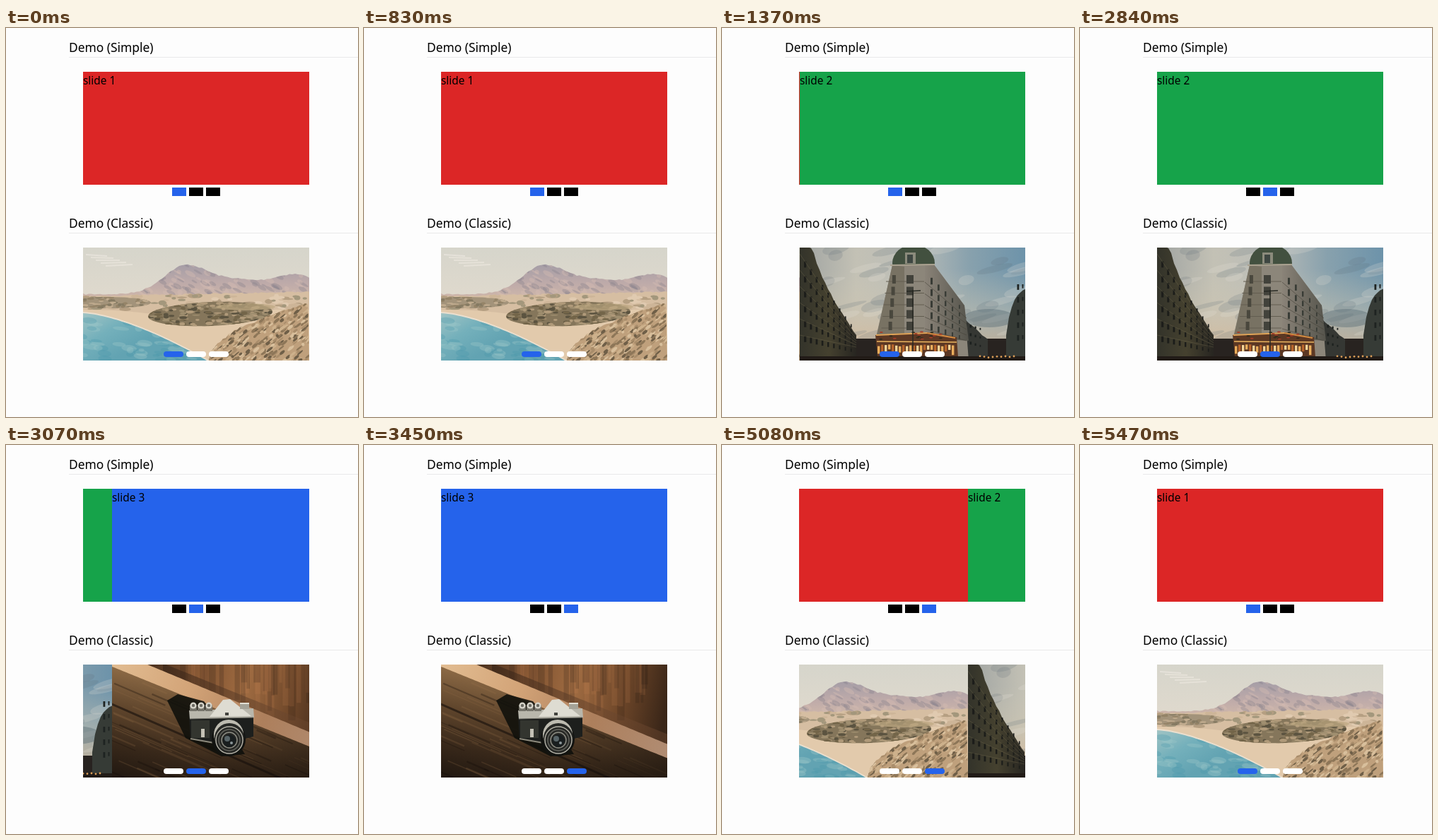
Recreate the animation shown at these times as an HTML page with a canvas. Size 498x551 px, loop 5490 ms.

```html
<!DOCTYPE html>
<html lang="en">
<head>
<meta charset="utf-8">
<title>Carousel demo</title>
<style>
html, body { margin: 0; width: 100%; height: 100%; overflow: hidden; background: #fdfdfd; }
body { position: relative; color: #000; font-family: "Noto Sans", "Open Sans", sans-serif; }
h2 { position: absolute; left: 89px; right: 0; margin: 0; height: 28px; font-size: 17.4px; font-weight: 400; line-height: 28px; border-bottom: 1px solid #e9e9ea; }
.view { position: absolute; left: 109px; width: 320px; height: 160px; overflow: hidden; }
.strip { display: flex; width: 960px; height: 160px; }
.slide { width: 320px; font-size: 15.4px; line-height: 25px; }
.dot { position: absolute; }
.simple { top: 226px; width: 20px; height: 12px; background: #000; }
.classic { top: 458px; width: 28px; height: 8px; border-radius: 4px; background: #fff; }
.dot.on { background: #2563eb; }
</style>
</head>
<body>
<h2 style="top:13px">Demo (Simple)</h2>
<div class="view" style="top:62px">
  <div class="strip">
    <div class="slide" style="background:#dc2626">slide 1</div>
    <div class="slide" style="background:#16a34a">slide 2</div>
    <div class="slide" style="background:#2563eb">slide 3</div>
  </div>
</div>
<h2 style="top:262px">Demo (Classic)</h2>
<div class="view" style="top:311px">
  <div class="strip"><canvas id="pics" width="960" height="160"></canvas></div>
</div>
<script>
const W = 320, H = 160;
const c = document.getElementById('pics').getContext('2d');

let seed = 7;
function rnd(lo = 0, hi = 1) {
  seed = (seed * 16807) % 2147483647;
  return lo + (hi - lo) * seed / 2147483647;
}
const times = (n, fn) => { for (let i = 0; i < n; i++) fn(i); };
const bump = (x, mid, width, height) => height * Math.exp(-(((x - mid) / width) ** 2));

function paint(path, fill) {
  c.fillStyle = fill;
  c.fill(path);
  return path;
}
function rect(x, y, w, h, fill) {
  c.fillStyle = fill;
  c.fillRect(x, y, w, h);
}
function poly(fill, ...points) {
  const p = new Path2D();
  points.forEach(([x, y]) => p.lineTo(x, y));
  p.closePath();
  return paint(p, fill);
}
function oval(x, y, rx, ry, fill, tilt = 0) {
  const p = new Path2D();
  p.ellipse(x, y, rx, ry, tilt, 0, 7);
  return paint(p, fill);
}
const disc = (x, y, r, fill) => oval(x, y, r, r, fill);
function ring(x, y, r, color) {
  c.strokeStyle = color;
  c.lineWidth = 1.4;
  c.beginPath();
  c.arc(x, y, r, 0, 7);
  c.stroke();
}
function line(x1, y1, x2, y2, color, w = 1) {
  c.strokeStyle = color;
  c.lineWidth = w;
  c.beginPath();
  c.moveTo(x1, y1);
  c.lineTo(x2, y2);
  c.stroke();
}
// Everything below the curve y = f(x)
function below(f, fill, x0 = 0, x1 = W, rough = 0) {
  const p = new Path2D();
  p.moveTo(x0, H);
  for (let x = x0; x <= x1; x += 4) p.lineTo(x, f(x) + rnd(-rough, rough));
  p.lineTo(x1, H);
  p.closePath();
  return paint(p, fill);
}
function grad(x1, y1, x2, y2, ...colors) {
  const g = c.createLinearGradient(x1, y1, x2, y2);
  colors.forEach((k, i) => g.addColorStop(i / (colors.length - 1), k));
  return g;
}
// Scatter small blobs inside a path
function mottle(path, [x, y, w, h], n, size, colors, tilt = 0) {
  c.save();
  c.clip(path);
  times(n, i => oval(rnd(x, x + w), rnd(y, y + h), size * rnd(0.5, 1.5), size * rnd(0.2, 0.6), colors[i % colors.length], tilt));
  c.restore();
}
function scene(i, draw) {
  c.save();
  c.translate(i * W, 0);
  c.beginPath();
  c.rect(0, 0, W, H);
  c.clip();
  draw();
  c.restore();
}

function coast() {
  rect(0, 0, W, H, grad(0, 0, 0, 70, '#d6d5cb', '#dfd9cd'));
  times(5, i => line(4 + i * 7, 10 + i * 4, 34 + i * 9, 12 + i * 3, 'rgba(238,234,226,.6)', 2));
  const peak = x => 66 - bump(x, 145, 44, 40) - bump(x, 215, 45, 18) - bump(x, 300, 50, 28);
  const hill = below(peak, grad(0, 22, 0, 74, '#a39ca6', '#bca9a9', '#d0b8aa'), 0, W, 1);
  mottle(hill, [80, 25, 240, 48], 130, 6, ['rgba(212,188,178,.4)', 'rgba(132,126,138,.35)'], 0.5);

  const dune = below(x => 69 - x / 50, '#d6bea2', 0, W, 1);
  mottle(dune, [0, 68, W, 20], 110, 6, ['#a3977c', '#cdb598', '#b59f82', '#e0cab0']);
  below(x => 88 + bump(x, 130, 60, 8), '#e2caac');
  const scrub = oval(36, 78, 60, 8, '#a3937a');
  mottle(scrub, [0, 70, 96, 16], 60, 4, ['#857a62', '#c0ab8e', '#958468']);

  const shore = x => 93 + 67 * (x / 175) ** 1.5;
  below(x => shore(x) - 2, '#ece0cf', 0, 180);
  const sea = below(shore, grad(0, 94, 40, H, '#9fc3c4', '#74b0bb', '#62a3b2'), 0, 176);
  mottle(sea, [0, 94, 176, 66], 70, 8, ['rgba(150,194,198,.4)', 'rgba(72,148,170,.3)'], 0.1);

  const bank = oval(180, 94, 88, 17, '#85765b', -0.04);
  mottle(bank, [90, 78, 180, 36], 230, 4, ['#5b5340', '#a08f70', '#736549', '#b09a7a']);
  oval(230, 84, 42, 5, 'rgba(190,168,130,.7)');
  const cliff = x => H - 82 * Math.sqrt(Math.max(0, x - 178) / 142);
  const rocks = below(cliff, '#bfa07c', 178, W, 2);
  mottle(rocks, [178, 78, 142, 82], 420, 4, ['#8d7658', '#d8bf9c', '#6f5f48', '#cdb18c', '#a98d6b'], -0.7);
}

// Rows of windows that shrink towards the far end of a wall
function windows(x0, x1, rows, cols, yAt, h, fill) {
  times(rows, r => times(cols, k => {
    const u = (k + 0.5) / cols;
    rect(x0 + (x1 - x0) * u, yAt(r, u), 3.2 - u * 1.6, h * (1 - u * 0.5), fill);
  }));
}

function street() {
  rect(0, 0, W, H, grad(0, 0, W, 0, '#9fa3a1', '#c3c1b5', '#bbbdb8', '#88a1ad', '#6d93aa'));
  rect(0, 0, W, H, grad(0, 30, 0, 145, 'rgba(208,202,182,0)', 'rgba(208,198,176,.45)', 'rgba(216,182,146,.75)'));
  times(45, i => oval(rnd(30, W), rnd(0, 125), rnd(10, 30), rnd(3, 8), i % 2 ? 'rgba(226,224,212,.22)' : 'rgba(92,108,118,.18)', -0.25));
  oval(268, 100, 36, 13, 'rgba(83,102,112,.4)');
  rect(65, 129, 255, 31, '#282320');

  // Side streets
  below(x => x < 19 ? 0 : 128 * ((x - 19) / 64) ** 0.7, grad(0, 0, 82, 0, '#33332a', '#45412f', '#262420'), 0, 80, 1);
  windows(2, 76, 6, 9, (r, u) => 14 + r * 22 + u * (100 - r * 16), 9, '#1c1d1a');
  times(6, i => line(0, 9 + i * 23, 80, 126 + i * 3, 'rgba(110,102,76,.4)'));
  below(x => 34 + 900 / (x - 282), '#363b36', 292, W, 1);
  windows(304, 318, 5, 2, r => 52 + r * 18, 9, '#1e2321');
  below(x => 96 + (x - 226) * 0.85, '#353733', 226, 266, 1);
  windows(230, 258, 3, 4, (r, u) => 106 + r * 12 + u * 9, 5, '#1c201e');

  // Corner house
  oval(161, 22, 30, 26, '#42503f');
  poly('#8c867a', [131, 25], [189, 23], [233, 82], [239, H], [112, H], [109, 122]);
  poly('#787263', [131, 25], [148, 27], [148, 124], [109, 124]);
  poly(grad(177, 0, 239, 0, '#8a8378', '#55544c'), [177, 25], [189, 23], [233, 82], [239, 132], [177, 128]);
  rect(149, 7, 15, 16, '#8b8b7c');
  rect(152, 10, 8, 12, '#3e4742');
  line(128, 25, 191, 24, '#aaa290', 2);
  times(5, i => {
    const y = 39 + i * 16.5;
    line(126 - y * 0.1, y + 9, 176, y + 9, '#625d50');
    rect(151, y, 10, 12, '#42423b');
    rect(134 - y * 0.08, y, 5, 12, '#49473d');
    line(177, y + 10, 236, 100 + i * 8, 'rgba(70,67,58,.6)');
  });
  windows(180, 230, 5, 5, (r, u) => 38 + r * 17 + u * (48 - r * 7), 10, '#393c36');

  // Lit ground floor
  poly('#5c3824', [107, 124], [180, 120], [222, 127], [224, 155], [110, 156]);
  line(108, 124, 180, 121, '#e0a458', 2);
  line(180, 121, 220, 128, '#d48c42', 2);
  times(22, i => rect(110 + i * 5, rnd(137, 140), 3.4, rnd(6, 14), ['#eaae5c', '#b8652c', '#f4d498'][i % 3]));
  line(109, 133, 222, 134, '#ecb660', 1.5);
  times(18, i => oval(rnd(108, 222), rnd(119, 130), 2.5, 1, i % 2 ? '#a33c28' : '#2f2b1c'));
  rect(0, 154, W, 6, '#211b17');
  line(160, 60, 160, 150, '#272923', 1.5);
  line(151, 62, 171, 61, '#272923', 1.5);
  times(9, i => disc(255 + i * 6, rnd(151, 156), 1.4, '#dc9e58'));
}

function camera() {
  // Blurred backdrop
  rect(0, 0, W, H, grad(60, 0, W, 50, '#4f3420', '#7f5230', '#a06c42', '#70482a', '#3a2618'));
  times(42, i => rect(rnd(90, W), 0, rnd(3, 11), rnd(25, 80), i % 2 ? 'rgba(198,134,84,.16)' : 'rgba(44,28,18,.22)'));

  // Plank with its bright rim
  const rim = x => 3 + x * 0.405;
  below(x => rim(x) - 34, grad(75, 0, 300, 0, 'rgba(52,34,22,.6)', 'rgba(120,80,54,.35)'), 72);
  below(x => rim(x) - 24 + x / 80, grad(0, 0, W, 120, '#e2bd92', '#d3a478', '#ad7f5c', '#b08c72'));
  const wood = below(rim, grad(50, 15, 20, 170, '#8a6844', '#5f452c', '#38281a', '#1d150f'));
  c.save();
  c.clip(wood);
  times(90, i => {
    const x = rnd(-40, 280), y = rnd(0, 170), n = rnd(25, 95);
    line(x, y, x + n, y + n * 0.43, i % 2 ? 'rgba(156,116,76,.2)' : 'rgba(18,12,8,.3)', rnd(0.7, 2.5));
  });
  line(-5, 54, 250, 166, 'rgba(20,14,10,.6)', 3);
  rect(0, 0, W, H, grad(150, 80, W, H, 'rgba(18,13,9,0)', 'rgba(18,13,9,.6)'));
  c.restore();
  poly('rgba(14,15,11,.88)', [78, 51], [93, 42], [130, 52], [178, 110], [188, 127], [155, 130], [104, 104]);

  // Body
  poly('#1d1f1d', [109, 72], [200, 70], [200, 102], [157, 113], [111, 106]);
  rect(112, 79, 26, 25, '#33352f');
  poly('#b9b7ac', [109, 65], [200, 62], [201, 75], [110, 77]);
  poly('#dedcd2', [138, 74], [157, 50], [167, 49], [197, 73]);
  line(110, 77, 200, 75, '#6f6e66');
  times(3, i => {
    const x = 115 + i * 11;
    rect(x - 5, 57, 10, 9, '#75736a');
    disc(x, 58, 4.5, '#d6d4ca');
    disc(x, 58, 2.2, '#6b6a62');
  });
  rect(181, 55, 13, 8, '#a5a398');
  line(181, 55, 194, 55, '#e2dfd4', 2);
  rect(160, 68, 5, 4, '#43433e');
  rect(126, 91, 5, 12, '#c4c1b5');
  line(111, 105, 150, 112, '#8c897c', 2);

  // Lens
  disc(165, 106, 24, '#121310');
  disc(165, 99, 21, '#bdbbb0');
  disc(166, 104, 21, '#272825');
  times(3, i => ring(166, 107, 19 - i * 4, ['#b5b3a8', '#65665f', '#8d8d84'][i]));
  disc(166, 108, 9, '#191e1f');
  disc(163, 105, 4, '#586467');
  disc(169, 111, 2, '#8b9699');
}

[coast, street, camera].forEach((draw, i) => scene(i, draw));

function makeDots(kind, left, step) {
  return [0, 1, 2].map(i => {
    const d = document.createElement('div');
    d.className = 'dot ' + kind;
    d.style.left = left + i * step + 'px';
    document.body.append(d);
    return d;
  });
}
const dots = [makeDots('simple', 235, 24), makeDots('classic', 223, 32)];
const strips = document.querySelectorAll('.strip');

const LOOP = 5490, FIRST = 830, EVERY = 2010, STEP = 33.4, LAG = 7, OMEGA = Math.sqrt(250);

// Critically damped spring, sampled at the stepped display rate
function scrollState(t) {
  const n = Math.floor((t - FIRST) / EVERY);
  if (n < 0) return { x: 0, active: 0 };
  const from = n, to = (n + 1) % 3;
  const tick = Math.floor((t - FIRST - n * EVERY + 5) / STEP) * STEP;
  const u = OMEGA * Math.max(0, tick - LAG) / 1000;
  const gap = W * (from - to) * (1 + u) * Math.exp(-u);
  const settled = Math.abs(gap) < 0.6;
  return { x: settled ? to * W : Math.round(to * W + gap), active: settled ? to : from };
}

function frame(now) {
  const { x, active } = scrollState(now % LOOP);
  strips.forEach(s => { s.style.transform = `translateX(${-x}px)`; });
  dots.forEach(set => set.forEach((d, i) => d.classList.toggle('on', i === active)));
  requestAnimationFrame(frame);
}
frame(performance.now());
</script>
</body>
</html>
```
